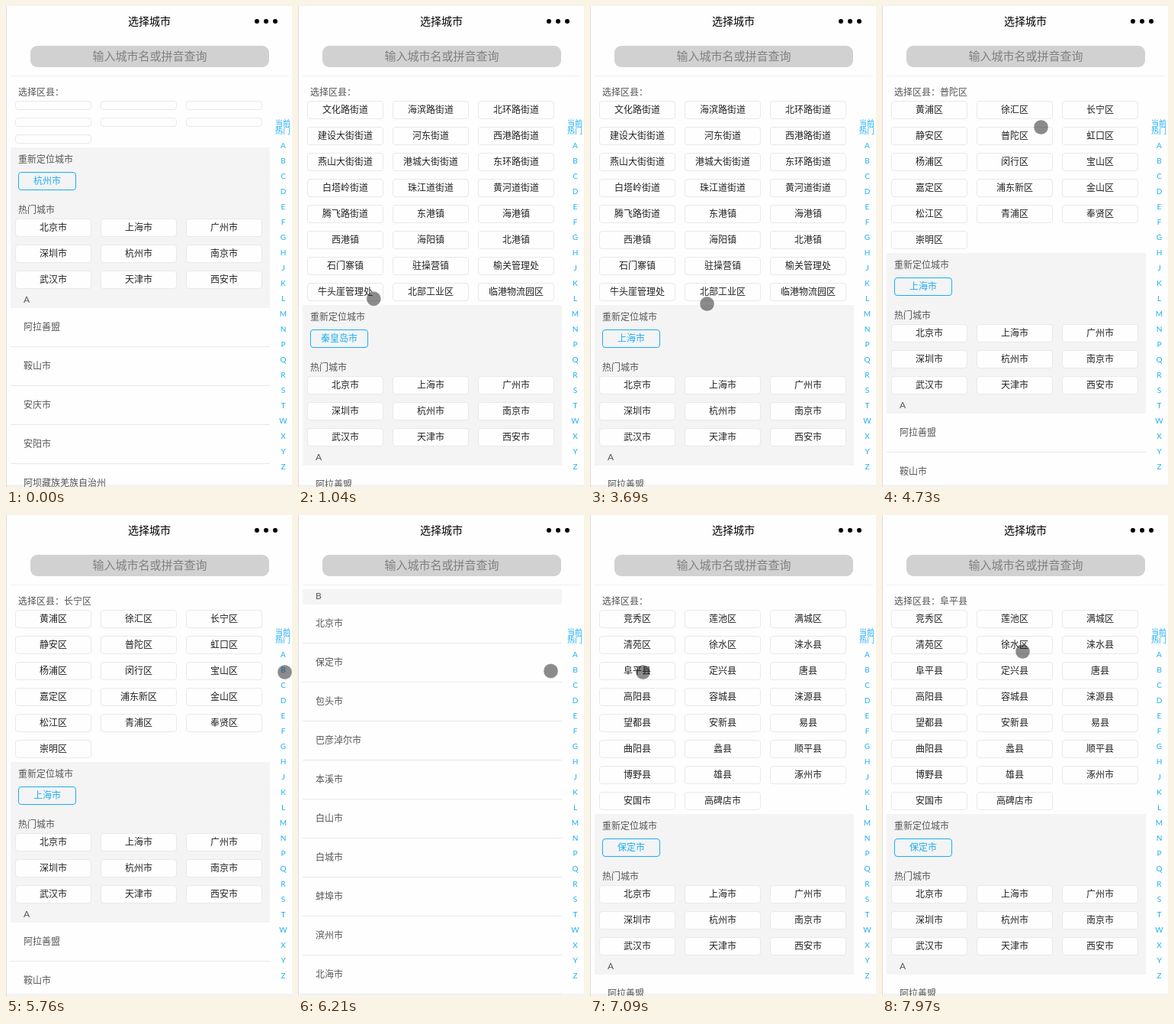
Recreate the animation shown at these times as an HTML page. Size 375 by 629 pixels, loop 8 s.

```html
<!DOCTYPE html>
<html lang="zh-CN">
<head>
<meta charset="utf-8">
<title>选择城市</title>
<style>
  html, body { margin: 0; width: 100%; height: 100%; overflow: hidden; background: #fefefe; }
  svg { display: block; }
  text { font-family: "Noto Sans CJK SC", "Noto Sans CJK", sans-serif; }
  .latin { font-family: Lato, "Noto Sans", sans-serif; }
</style>
</head>
<body>
<svg id="stage" width="375" height="629" viewBox="0 0 375 629">
  <defs><clipPath id="viewport"><rect y="97" width="375" height="532"/></clipPath></defs>
  <g id="chrome"></g>
  <g id="page" clip-path="url(#viewport)"></g>
  <g id="index"></g>
  <circle id="pointer" cx=".5" cy=".5" r="9.5" fill="#000" fill-opacity=".45" stroke="#fff" stroke-opacity=".3"/>
</svg>
<script>
const LOOP = 8000, STEP = 147.3, START = 888;
const BLUE = '#1aadf8', GREY = '#555', DARK = '#222';
const words = s => s.split(' ');
const el = id => document.getElementById(id);

const hotCities = words('北京市 上海市 广州市 深圳市 杭州市 南京市 武汉市 天津市 西安市');
const citiesA = words('阿拉善盟 鞍山市 安庆市 安阳市 阿坝藏族羌族自治州');
const citiesB = words('北京市 保定市 包头市 巴彦淖尔市 本溪市 白山市 白城市 蚌埠市 滨州市 北海市');
const blank = Array(7).fill('');
const qinhuangdao = words('文化路街道 海滨路街道 北环路街道 建设大街街道 河东街道 西港路街道 ' +
  '燕山大街街道 港城大街街道 东环路街道 白塔岭街道 珠江道街道 黄河道街道 腾飞路街道 东港镇 海港镇 ' +
  '西港镇 海阳镇 北港镇 石门寨镇 驻操营镇 榆关管理处 牛头崖管理处 北部工业区 临港物流园区');
const shanghai = words('黄浦区 徐汇区 长宁区 静安区 普陀区 虹口区 杨浦区 闵行区 宝山区 ' +
  '嘉定区 浦东新区 金山区 松江区 青浦区 奉贤区 崇明区');
const baoding = words('竞秀区 莲池区 满城区 清苑区 徐水区 涞水县 阜平县 定兴县 唐县 高阳县 容城县 涞源县 ' +
  '望都县 安新县 易县 曲阳县 蠡县 顺平县 博野县 雄县 涿州市 安国市 高碑店市');

// Each scene: first step, located city, districts, chosen district, scrolled to B
const scenes = [
  [-99, '杭州市', blank, ''],
  [-2, '秦皇岛市', qinhuangdao, ''],
  [9, '秦皇岛市', qinhuangdao, '海阳镇'],
  [18, '上海市', qinhuangdao, ''],
  [20, '上海市', shanghai, ''],
  [26, '上海市', shanghai, '普陀区'],
  [29, '上海市', shanghai, '长宁区'],
  [35, '上海市', shanghai, '长宁区', true],
  [41, '保定市', shanghai, ''],
  [42, '保定市', baoding, ''],
  [43, '保定市', baoding, '阜平县']
];

// Pointer path: step, x, y
const path = [
  [-2, 34, 408], [-1, 34, 408], [4, 218, 335], [7, 180, 307], [8, 180, 307],
  [9, 181, 295], [16, 173, 499], [17, 173, 499], [18, 168, 475], [19, 153, 389],
  [24, 200, 172], [25, 200, 172], [26, 208, 158], [29, 284, 142], [32, 362, 208],
  [33, 365, 205], [35, 365, 205], [40, 38, 190], [41, 38, 192], [42, 69, 205],
  [43, 72, 215], [44, 150, 231], [45, 334, 190], [46, 300, 109], [48, 184, 178]
];

function text(s, x, cy, size, fill, anchor = 'start') {
  const cls = /^[A-Z]$/.test(s) ? ' class="latin"' : '';
  return `<text${cls} x="${x}" y="${Math.round(cy + size * .37)}" font-size="${size}" fill="${fill}" text-anchor="${anchor}">${s}</text>`;
}

function rect(x, y, w, h, fill, more = '') {
  return `<rect x="${x}" y="${y}" width="${w}" height="${h}" fill="${fill}" ${more}/>`;
}

function button(s, x, y, w, h, ink, border, fill) {
  return rect(x + .5, y + .5, w - 1, h - 1, fill, `rx="3.5" stroke="${border}"`) +
    text(s, x + w / 2, y + h / 2, 12, ink, 'middle');
}

function buttonGrid(names, top) {
  const h = names[0] ? 24 : 12;
  return names.map((s, i) =>
    button(s, 12 + i % 3 * 112, top + Math.floor(i / 3) * (h + 10), 100, h, DARK, '#e9e9e9', '#fefefe')).join('');
}

function cityRows(names, top) {
  return names.map((s, i) =>
    text(s, 23, top + i * 51 + 25, 12, GREY) + rect(6, top + i * 51 + 50, 340, 1, '#e8e8e8')).join('');
}

function drawScene([, city, districts, chosen, atB]) {
  if (atB) {
    return rect(6, 97, 340, 20, '#f4f4f4') + text('B', 23, 106, 12, GREY) + cityRows(citiesB, 117);
  }
  const pitch = districts[0] ? 34 : 22;
  const top = 119 + Math.ceil(districts.length / 3) * pitch;
  return text('选择区县：' + chosen, 16, 113, 12, GREY) +
    buttonGrid(districts, 124) +
    rect(6, top, 340, 210, '#f4f4f4') +
    text('重新定位城市', 16, top + 16, 12, GREY) +
    button(city, 16, top + 32, 76, 24, BLUE, BLUE, '#f4f4f4') +
    text('热门城市', 16, top + 82, 12, GREY) +
    buttonGrid(hotCities, top + 93) +
    text('A', 23, top + 199, 12, GREY) +
    cityRows(citiesA, top + 210);
}

function pointerAt(step) {
  const i = path.findIndex(key => key[0] >= step);
  if (i < 1) return path[0].slice(1);
  const [a, x0, y0] = path[i - 1], [b, x1, y1] = path[i];
  const u = (step - a) / (b - a), k = u * u * (3 - 2 * u);
  return [x0 + (x1 - x0) * k, y0 + (y1 - y0) * k];
}

el('chrome').innerHTML =
  rect(0, 0, 1, 629, '#dcdcdc') +
  text('选择城市', 188, 20, 14, '#000', 'middle') +
  [329, 341, 353].map(x => `<circle cx="${x}" cy="20" r="3"/>`).join('') +
  rect(32, 52, 313, 28, '#d1d1d1', 'rx="9"') +
  text('输入城市名或拼音查询', 188.5, 65, 15, '#808080', 'middle') +
  rect(6, 91, 365, 1, '#f0f0f0') +
  rect(1, 626, 374, 3, '#f3f3f3');

el('index').innerHTML =
  text('当前', 363, 153, 10, BLUE, 'middle') + text('热门', 363, 163, 10, BLUE, 'middle') +
  [...'ABCDEFGHJKLMNPQRSTWXYZ'].map((c, i) => text(c, 363.5, 182 + i * 20, 10, BLUE, 'middle')).join('');

let shown;
function render(now) {
  const step = Math.min(48, Math.floor((now % LOOP - START) / STEP));
  const scene = scenes.filter(s => s[0] <= step).pop();
  if (scene !== shown) el('page').innerHTML = drawScene(shown = scene);
  const [x, y] = pointerAt(step);
  el('pointer').setAttribute('transform', `translate(${x} ${y})`);
  el('pointer').setAttribute('visibility', step < -2 ? 'hidden' : 'visible');
}

const begin = performance.now();
function tick() {
  render(performance.now() - begin);
  requestAnimationFrame(tick);
}
tick();
</script>
</body>
</html>
```
